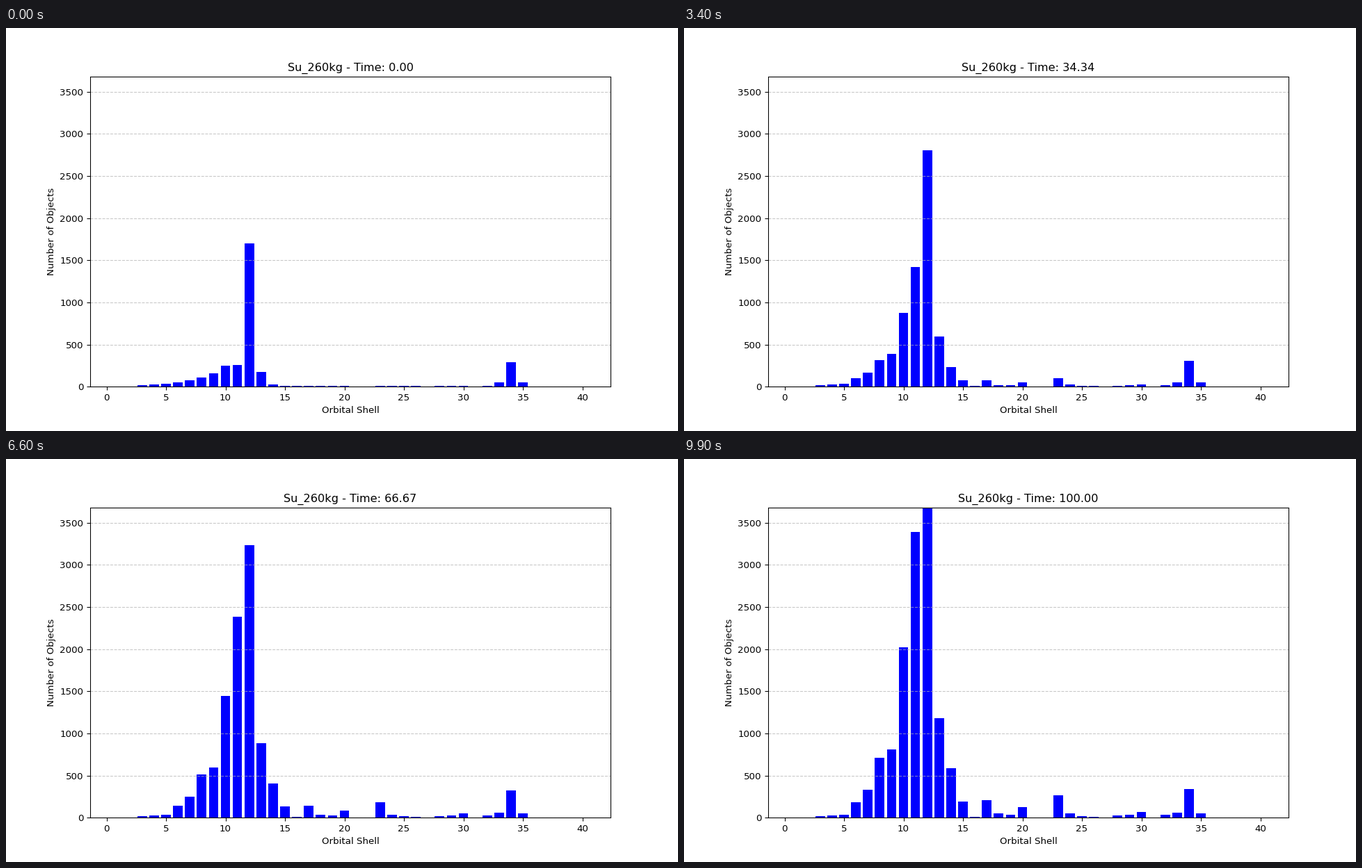
Write a matplotlib script that moves like this. It is 966x580 px and loops after 10 s.

```python
import numpy as np
import matplotlib.pyplot as plt
from matplotlib.animation import FuncAnimation

plt.rcParams["font.family"] = "DejaVu Sans"

FRAMES = 100
DPI = 96.6
SETTLE = 2.0  # time constant of the early jump
shells = np.arange(1, 41)
occupied = (shells > 2) & (shells < 36) & ~np.isin(shells, [21, 22, 27, 31])


def peak(center, height, left, right):
    """Spike that shrinks by a fixed ratio per shell on each side."""
    ratio = np.where(shells < center, left, right)
    return height * ratio ** np.abs(shells - center)


# Steady population: a small floor, the crowded band and the high shell.
base = 8 + peak(10, 235, 0.66, 0.45) + peak(12, 2290, 0.12, 0.11)
base += peak(34, 285, 0.14, 0.14)

# Growth over the whole run: one broad hump and a few narrow spikes.
rise = np.interp(shells, [5, 7, 8, 9, 10, 11, 12, 13, 15, 16],
                 [0, 256, 598, 644, 1749, 2998, 1336, 902, 175, 0])
rise += peak(17, 197, 0, 0.18) + peak(20, 113, 0.2, 0)
rise += peak(23, 260, 0, 0.17) + peak(30, 60, 0.5, 0.6) + peak(34, 36, 0, 0)

# Shortfall at the start, made up within the first few years.
gap = peak(12, 643, 0.2, 0.16)


def heights(t):
    return occupied * (base + rise * t / 100 - gap * np.exp(-t / SETTLE))


# The hundredth of a pixel keeps the size from rounding down.
fig, ax = plt.subplots(figsize=(966.01 / DPI, 580.01 / DPI), dpi=DPI)
bars = ax.bar(shells, heights(0), color="blue")
ax.set_ylim(0, heights(100).max())
ax.set_xlabel("Orbital Shell")
ax.set_ylabel("Number of Objects")
ax.grid(axis="y", linestyle="--", alpha=0.7)
title = ax.set_title("")


def update(i):
    t = 100 * i / (FRAMES - 1)
    for bar, h in zip(bars, heights(t)):
        bar.set_height(h)
    title.set_text(f"Su_260kg - Time: {t:.2f}")
    return [*bars, title]


anim = FuncAnimation(fig, update, frames=FRAMES, interval=100,
                     repeat=True, repeat_delay=0, blit=False)
plt.show()
```
